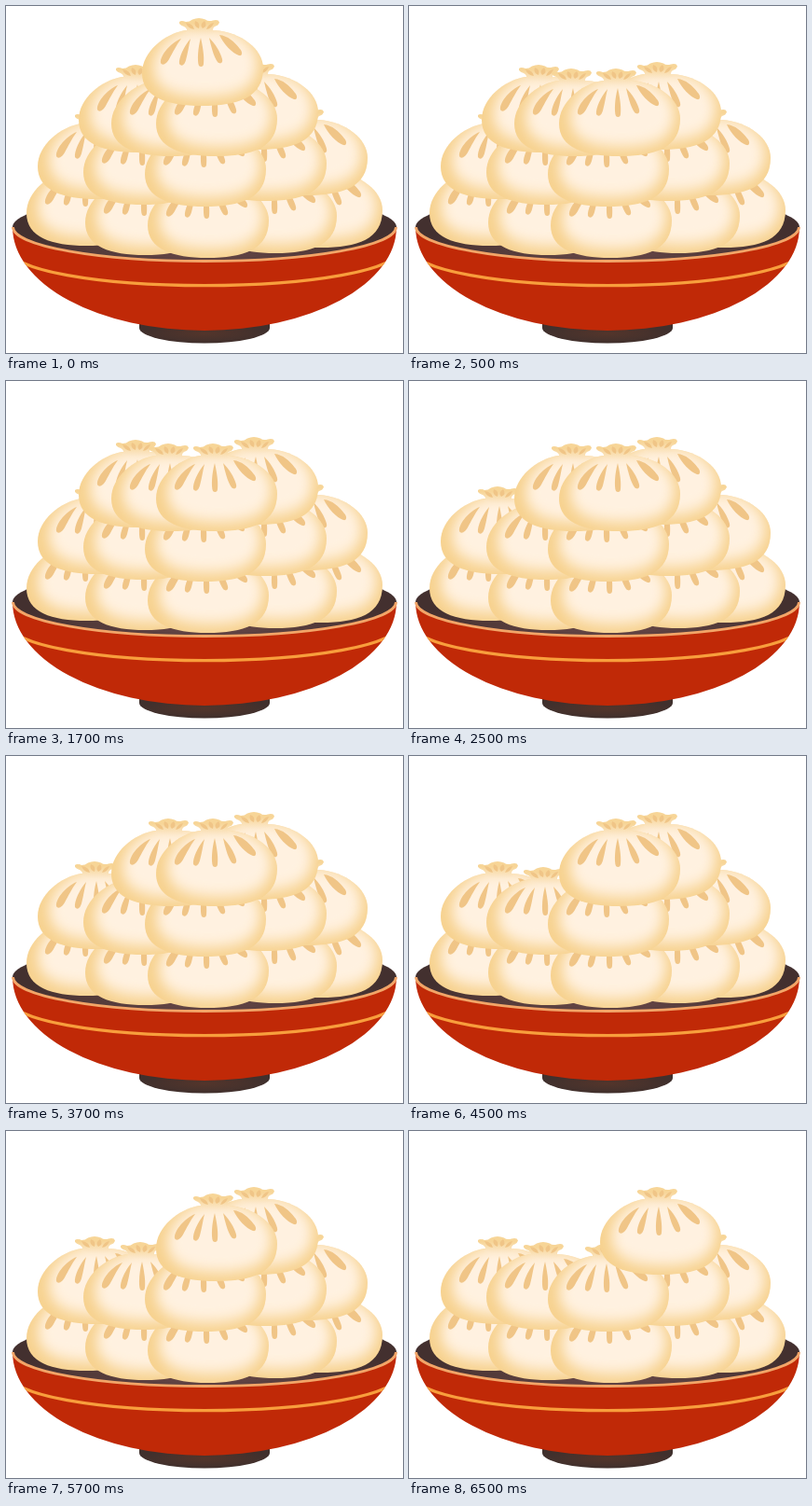
An HTML page that plays this animation: 426x372 px, repeating every 8 s.

```html
<!DOCTYPE html>
<html lang="en">
<head>
<meta charset="utf-8">
<title>Bowl of buns</title>
<style>
html, body { margin: 0; width: 100%; height: 100%; overflow: hidden; background: #fff; }
svg { display: block; width: 100%; height: 100%; }
</style>
</head>
<body>
<svg viewBox="0 0 426 372" xmlns="http://www.w3.org/2000/svg">
  <defs>
    <radialGradient id="inside" cx=".5" cy=".85" r=".5">
      <stop offset="0" stop-color="#6a4949"/>
      <stop offset="1" stop-color="#43302f"/>
    </radialGradient>
    <radialGradient id="base">
      <stop offset="0" stop-color="#53352b"/>
      <stop offset="1" stop-color="#40302d"/>
    </radialGradient>
    <linearGradient id="neck" x2="0" y2="1">
      <stop offset=".3" stop-color="#f7d597"/>
      <stop offset="1" stop-color="#fdebd2"/>
    </linearGradient>
    <filter id="soft" x="-20%" y="-20%" width="140%" height="140%" color-interpolation-filters="sRGB">
      <feGaussianBlur stdDeviation="8"/>
    </filter>
    <path id="dough" d="M46 13C24 17 0 36 0 59C0 85 27 94 64 94C103 94 130 85 130 54C130 33 106 15 78 13Z"/>
    <clipPath id="edge"><use href="#dough"/></clipPath>
    <g id="bun">
      <use href="#dough" fill="#f7d28f"/>
      <g clip-path="url(#edge)">
        <use href="#dough" fill="#fff1e0" filter="url(#soft)" transform="translate(12 0) scale(.86 .9)"/>
      </g>
      <path fill="url(#neck)" d="M47 16Q50 12 45 9Q39 7 40 4Q42 2 47 4Q51 4 54 1.5Q61-1.5 68 1.5Q71 4 76 2.5Q82 1 83 4.5Q82 8 78 9Q74 12 78 16Q62 21 47 16Z"/>
      <g fill="#f0c587">
        <path d="M42 22C31 26 19 40 20 48C22 52 27 48 29 44C33 37 36 30 42 22Z"/>
        <path d="M52 22C45 30 39 43 40 49C43 53 46 49 47 45C49 38 50 30 52 22Z"/>
        <path d="M63 21C60 31 59 46 61 51C63 53 66 52 66 49C67 41 65 30 63 21Z"/>
        <path d="M72 21C74 30 77 42 81 47C84 50 87 48 86 44C84 36 78 27 72 21Z"/>
        <path d="M83 18C87 27 97 38 104 40C108 41 108 36 105 33C99 25 92 19 83 18Z"/>
        <path d="M47 5Q55 6 56 12Q49 11 47 5Z"/>
        <path d="M57 3Q63 5 61 11Q55 9 57 3Z"/>
        <path d="M67 3Q71 8 65 11Q61 7 67 3Z"/>
        <path d="M77 5Q75 11 69 12Q71 6 77 5Z"/>
      </g>
    </g>
    <path id="bowl" d="M7 237A206 111 0 0 0 419 237A206 36 0 0 1 7 237Z"/>
    <clipPath id="bowlEdge"><use href="#bowl"/></clipPath>
  </defs>
  <path fill="url(#base)" d="M143 341V345A70 16.5 0 0 0 283 345V341Z"/>
  <ellipse cx="213" cy="237" rx="206" ry="36" fill="url(#inside)"/>
  <g id="pile"></g>
  <use href="#bowl" fill="#c02907"/>
  <g fill="none">
    <path d="M7.5 237A205.5 36.5 0 0 0 418.5 237" stroke="#f2a568" stroke-width="2.8"/>
    <path d="M5 262A208 37.7 0 0 0 421 262" stroke="#f89e3c" stroke-width="3.2" clip-path="url(#bowlEdge)"/>
  </g>
</svg>
<script>
const LOOP = 8000;
// x, y and, for buns that get eaten, the moment they go (back to front)
const buns = [
  [274, 165], [225, 171], [22, 163], [85, 173], [152, 176],
  [258, 109], [214, 115], [34, 113], [83, 119], [149, 121],
  [205, 60], [78, 63, 2500], [113, 67, 4500], [161, 67, 6500],
  [146, 13, 500]
];
const pile = document.getElementById('pile');

const parts = buns.map(([x, y, gone = LOOP]) => {
  const el = document.createElementNS('http://www.w3.org/2000/svg', 'use');
  el.setAttribute('href', '#bun');
  el.setAttribute('x', x);
  el.setAttribute('y', y);
  pile.append(el);
  return { el, gone };
});

function draw(t) {
  for (const { el, gone } of parts) {
    el.style.display = t < gone ? '' : 'none';
  }
}

const start = performance.now();
function tick() {
  draw((performance.now() - start) % LOOP);
  requestAnimationFrame(tick);
}
tick();
</script>
</body>
</html>
```
